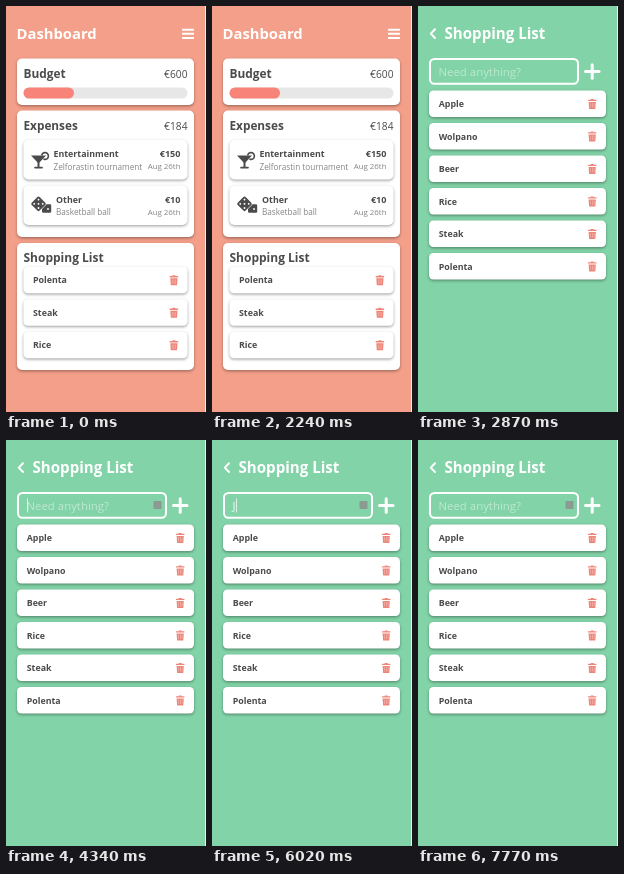
Write an HTML page with a canvas that moves like this. It is 200 px wide and 406 px high and loops after 8 s.

```html
<!DOCTYPE html>
<html lang="en">
<head>
<meta charset="utf-8">
<title>Household app</title>
<style>
html, body { margin: 0; width: 100%; height: 100%; overflow: hidden; background: #f39f89; }
canvas { display: block; width: 200px; height: 406px; }
</style>
</head>
<body>
<canvas id="stage"></canvas>
<script>
const W = 200, H = 406, LOOP = 8000;
const FONT = '"Open Sans", "Noto Sans", sans-serif';
const INK = '#4b4b4b', SOFT = '#858585', RED = '#ee8579';
const SALMON = '#f39f89', GREEN = '#82d3a7';

const canvas = document.getElementById('stage');
const ctx = canvas.getContext('2d');
const ratio = window.devicePixelRatio || 1;
canvas.width = W * ratio;
canvas.height = H * ratio;

function text(str, x, y, size, color, weight = 400, align = 'left') {
  ctx.font = `${weight} ${size}px ${FONT}`;
  ctx.textAlign = align;
  ctx.fillStyle = color;
  ctx.fillText(str, x, y);
}

function box(x, y, w, h, r, color) {
  ctx.beginPath();
  ctx.roundRect(x, y, w, h, r);
  ctx.fillStyle = color;
  ctx.fill();
}

function card(x, y, w, h, r = 5) {
  ctx.save();
  ctx.shadowColor = 'rgba(0,0,0,0.36)';
  ctx.shadowBlur = 3 * ratio;
  ctx.shadowOffsetY = 1.2 * ratio;
  box(x, y, w, h, r, '#fff');
  ctx.restore();
}

function line(points, width, color, cap = 'butt') {
  ctx.beginPath();
  points.forEach(([x, y]) => ctx.lineTo(x, y));
  ctx.lineWidth = width;
  ctx.lineCap = cap;
  ctx.lineJoin = 'round';
  ctx.strokeStyle = color;
  ctx.stroke();
}

function dot(x, y, r, color) {
  ctx.beginPath();
  ctx.arc(x, y, r, 0, Math.PI * 2);
  ctx.fillStyle = color;
  ctx.fill();
}

function trash(x, y) {
  box(x, y + 0.9, 8.6, 1.3, 0.5, RED);
  box(x + 2.7, y, 3.2, 1.4, 0.5, RED);
  ctx.beginPath();
  ctx.moveTo(x + 0.7, y + 3);
  ctx.lineTo(x + 7.9, y + 3);
  ctx.lineTo(x + 7.4, y + 10);
  ctx.lineTo(x + 1.2, y + 10);
  ctx.fillStyle = RED;
  ctx.fill();
  for (let i = 0; i < 3; i++) box(x + 2.3 + i * 1.8, y + 4.2, 0.5, 4.5, 0, '#f8c4bc');
}

function cocktail() {
  ctx.beginPath();
  ctx.arc(39, 150, 3.4, -Math.PI * 0.95, Math.PI * 0.65);
  ctx.lineWidth = 1.6;
  ctx.strokeStyle = INK;
  ctx.stroke();
  ctx.beginPath();
  ctx.moveTo(25, 149.5);
  ctx.lineTo(40, 149.5);
  ctx.lineTo(32.5, 157.5);
  ctx.fillStyle = INK;
  ctx.fill();
  box(31.5, 155, 2, 7, 0, INK);
  box(28.2, 160.8, 8.6, 1.7, 0.8, INK);
}

function dice() {
  box(36, 198.2, 9.2, 8.6, 1.3, INK);
  dot(42, 203, 0.9, '#fff');
  ctx.save();
  ctx.translate(32.5, 197.8);
  ctx.rotate(Math.PI / 4);
  box(-6.2, -6.2, 12.4, 12.4, 1.8, '#fff');
  box(-5.6, -5.6, 11.2, 11.2, 1.6, INK);
  for (const [x, y] of [[0, 0], [-3, -3], [3, 3], [-3, 3], [3, -3]]) dot(x, y, 0.95, '#fff');
  ctx.restore();
}

function expense(y, x, title, note, price) {
  text(title, x, y + 17, 8.85, INK, 700);
  text(note, x, y + 29.7, 8.2, SOFT);
  text(price, 174.5, y + 17.2, 9.1, INK, 700, 'right');
  text('Aug 26th', 174.5, y + 29, 7.9, SOFT, 400, 'right');
}

function listItem(name, x, y, w, inset) {
  card(x, y, w, 26.5, 4.5);
  text(name, x + inset, y + 16.6, 8.85, INK, 700);
  trash(x + w - inset - 8.4, y + 8.4);
}

function dashboard() {
  ctx.fillStyle = SALMON;
  ctx.fillRect(0, 0, W, H);
  text('Dashboard', 10.5, 33, 14.8, '#fff', 700);
  for (let i = 0; i < 3; i++) box(176, 22.7 + i * 4.1, 12, 2, 0.6, '#fff');

  card(11, 52.5, 177, 46.5);
  text('Budget', 17.5, 72, 11.9, INK, 700);
  text('€600', 181.5, 71.5, 10.2, INK, 400, 'right');
  box(17.5, 81.5, 164, 11, 5.5, '#e7e7e7');
  box(17.5, 81.5, 50.5, 11, 5.5, '#f78379');

  card(11, 104.5, 177, 126.5);
  text('Expenses', 17.5, 124, 11.8, INK, 700);
  text('€184', 181.5, 123.5, 10.2, INK, 400, 'right');
  card(17.5, 134, 164, 39.5);
  cocktail();
  expense(134, 47.5, 'Entertainment', 'Zelforastin tournament', '€150');
  card(17.5, 179.5, 164, 39.5);
  dice();
  expense(179.5, 50, 'Other', 'Basketball ball', '€10');

  card(11, 237, 177, 127);
  text('Shopping List', 17.5, 256, 12, INK, 700);
  ['Polenta', 'Steak', 'Rice'].forEach((name, i) =>
    listItem(name, 17.5, 260.8 + i * 32.5, 164, 9.5));
}

// [start, value] keys while the field is being filled
const TYPED = [[0, ''], [6000, 'J'], [6290, 'Ju'], [6570, 'Jui'], [6850, 'Juic'], [7060, 'Juice'], [7340, '']];
const CARET = [[4050, 4610], [5100, 5660], [6000, 6290]];

function field(t) {
  ctx.beginPath();
  ctx.roundRect(12, 53, 148, 24.8, 4.5);
  ctx.lineWidth = 2;
  ctx.strokeStyle = '#fff';
  ctx.stroke();
  const value = TYPED.filter(([start]) => t >= start).pop()[1];
  if (value) text(value, 20.5, 69.7, 11.4, '#f2fbf6');
  else text('Need anything?', 20.5, 69.7, 11.4, '#bce9d0');
  if (CARET.some(([on, off]) => t >= on && t < off)) {
    ctx.font = `400 11.4px ${FONT}`;
    box(21 + ctx.measureText(value).width, 58.5, 0.9, 14, 0, '#e9f8f0');
  }
  if (t >= 4050) box(147.5, 61, 8, 8, 1, '#8b9a92');
}

function shoppingList(t) {
  ctx.fillStyle = GREEN;
  ctx.fillRect(0, 0, W, H);
  line([[17, 23.2], [12.8, 27.6], [17, 32]], 2, '#fff', 'round');
  text('Shopping List', 26.5, 33, 15.1, '#fff', 700);
  field(t);
  line([[167.5, 65.5], [181, 65.5]], 3, '#fff', 'round');
  line([[174.2, 58.8], [174.2, 72.2]], 3, '#fff', 'round');
  ['Apple', 'Wolpano', 'Beer', 'Rice', 'Steak', 'Polenta'].forEach((name, i) =>
    listItem(name, 11, 84.5 + i * 32.5, 177, 9.7));
}

function frame(now) {
  const t = now % LOOP;
  ctx.setTransform(ratio, 0, 0, ratio, 0, 0);
  if (t < 2300) dashboard();
  else shoppingList(t);
  box(199, 0, 1, H, 0, '#f1f1f1');
  requestAnimationFrame(frame);
}

requestAnimationFrame(frame);
</script>
</body>
</html>
```
